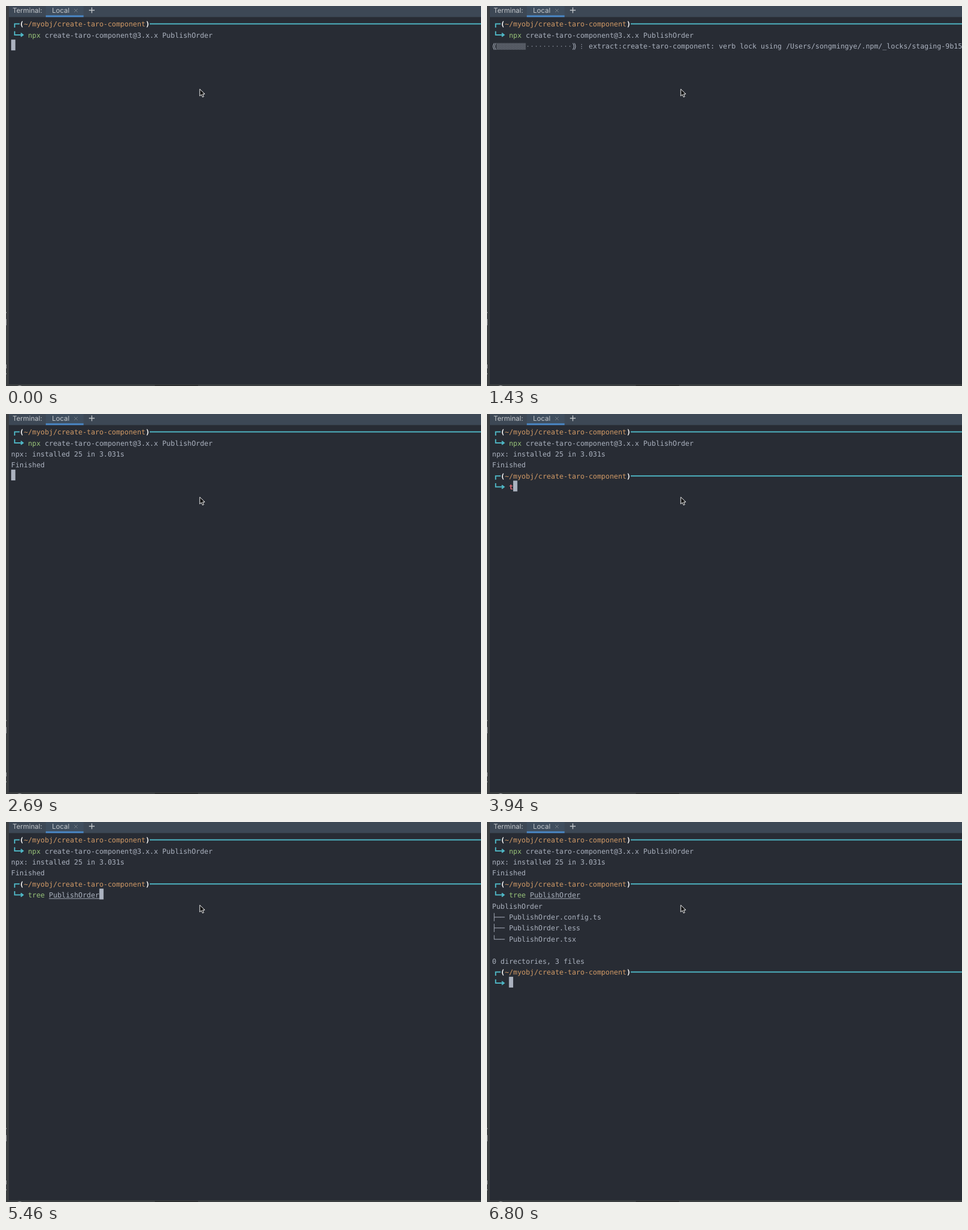
An HTML page that plays this animation: 836x670 px, repeating every 8000 ms.

```html
<!DOCTYPE html>
<html lang="en">
<head>
<meta charset="utf-8">
<title>Terminal</title>
<style>
  html, body { margin: 0; width: 100%; height: 100%; overflow: hidden; background: #282c34; }
  svg { display: block; }
  text { white-space: pre; text-rendering: geometricPrecision; }
  .mono { font: 12.275px "DejaVu Sans Mono", monospace; }
  .ui { font: 12px Inter, sans-serif; fill: #c3c7cb; }
  .bold { font-weight: bold; }
</style>
</head>
<body>
<svg id="stage" width="836" height="670" viewBox="0 0 836 670">
  <defs>
    <pattern id="shade" width="2.463" height="2.6" patternUnits="userSpaceOnUse" x="16.5" y="65.4">
      <rect x="0.1" y="0.1" width="1.05" height="1.05" fill="#abb2bf"/>
      <rect x="1.33" y="1.4" width="1.05" height="1.05" fill="#abb2bf"/>
    </pattern>
  </defs>
  <rect width="836" height="670" fill="#3c3f41"/>
  <rect x="5" y="19" width="831" height="648" fill="#282c34"/>
  <rect x="5" width="831" height="19.5" fill="#3d4855"/>
  <rect x="70" width="66.5" height="17" fill="#3f4e5e"/>
  <rect x="70" y="16.5" width="66.5" height="3" fill="#4a88c7"/>
  <text class="ui" x="11.5" y="12">Terminal:</text>
  <text class="ui" x="81" y="12">Local</text>
  <path d="M120 5l6 6M126 5l-6 6" stroke="#737c85" fill="none"/>
  <path d="M146 7.5h10M151 2.5v10" stroke="#c3c7cb" stroke-width="1.4" fill="none"/>
  <path d="M0 540.5h1M0 552v11M0 632v7M0 648.5h1" stroke="#b4b7ba" stroke-width="1.6" fill="none"/>
  <rect x="262" y="668" width="76" height="2" fill="#2b2d2f"/>
  <path d="M20 670.5q4-2.5 8 0" stroke="#a5a8ab" fill="none"/>
  <g id="screen"></g>
  <path d="M341 146.5v12.2l2.9-2.7 2 4.6 2.2-1-2-4.4h3.9z" fill="#111" stroke="#fff" stroke-width="1"/>
</svg>
<script>
const LOOP = 8000;
const X0 = 9.1, CELL = 7.39, ROW = 19.42;
const FG = "#abb2bf", CYAN = "#4fb8c6", GREEN = "#98c379", ORANGE = "#d19a66", RED = "#e06c75";
const screen = document.getElementById("screen");
const timed = [];

const colX = col => X0 + col * CELL;
const baseY = row => 36.1 + row * ROW;

function add(parent, tag, attrs, content) {
  const el = document.createElementNS("http://www.w3.org/2000/svg", tag);
  for (const key in attrs) el.setAttribute(key, attrs[key]);
  if (content) el.textContent = content;
  return parent.appendChild(el);
}

// A group that is visible from one time up to another.
function during(from, to) {
  const el = add(screen, "g", {});
  timed.push({ el, from, to });
  return el;
}

function write(g, row, col, content, fill = FG, bold = false) {
  add(g, "text", { class: bold ? "mono bold" : "mono", x: colX(col), y: baseY(row), fill }, content);
}

function cursor(g, row, col) {
  add(g, "rect", { x: colX(col), y: 20.4 + row * ROW, width: CELL, height: 19, fill: FG });
}

function line(g, d, stroke, width) {
  add(g, "path", { d, stroke, "stroke-width": width, fill: "none" });
}

function prompt(g, row) {
  const y = 31.5 + row * ROW, y2 = y + ROW;
  line(g, `M24 ${y}H15.2V${y + 6.5}M${colX(33)} ${y}H836`, CYAN, 2);
  line(g, `M15.2 ${y2 - 6.5}V${y2}H29.5M26 ${y2 - 3}L30 ${y2}L26 ${y2 + 3}`, CYAN, 2);
  write(g, row, 2, "(", "#fff", true);
  write(g, row, 3, "~/myobj/create-taro-component", ORANGE);
  write(g, row, 32, ")", "#fff", true);
}

function dot(g, col, dx, dy) {
  add(g, "circle", { cx: colX(col) + dx, cy: 71 + dy, r: 0.75, fill: FG });
}

// Braille spinner; dots are numbered 1-3 down the left, 4-6 down the right.
function spinner(g, dots) {
  for (const n of dots) dot(g, 21, n > 3 ? 5 : 2.2, ((n - 1) % 3 - 1) * 3.3 + 0.4);
}

function progress(from, to, filled, dots, message) {
  const g = during(from, to);
  for (const [x, dir] of [[15.6, -1], [151, 1]]) {
    for (const dx of [0, 2.7]) {
      const sx = x + dx * (dir < 0 ? -1 : 1);
      line(g, `M${sx} 65.5q${dir * 4.4} 5.8 0 11.6`, FG, 1.1);
    }
  }
  if (filled) add(g, "rect", { x: colX(1), y: 65.4, width: filled * CELL, height: 11.7, fill: "url(#shade)" });
  for (let i = filled; i < 18; i++) dot(g, i + 1, 3.7, 0);
  spinner(g, dots);
  write(g, 2, 23, message);
}

const first = during(0, LOOP);
prompt(first, 0);
write(first, 1, 4, "npx", GREEN);
write(first, 1, 8, "create-taro-component@3.x.x PublishOrder");

progress(780, 1170, 0, [1, 2, 4], "rollbackFailedOptional: verb npm-session 1c2c3ae0ac3c8ab2");
progress(1170, 1260, 2, [1, 4, 5], "loadIdealTree:loadAllDepsIntoIdealTree: sill install loadIdealTree");
progress(1260, 1430, 2, [4, 5, 6], "fetchMetadata: sill resolveWithNewModule create-taro-component@3.x.x checking installable status");
progress(1430, 2090, 7, [1, 2, 3], "extract:create-taro-component: verb lock using /Users/songmingye/.npm/_locks/staging-9b153f.lock");
progress(2090, 2195, 7, [1, 2, 3, 4], "extract:create-taro-component: sill extract create-taro-component@3.x.x extracted to staging");
progress(2195, 2300, 12, [3, 4, 5, 6], "finalize:create-taro-component: sill finalize create-taro-component");
progress(2300, 2480, 12, [3, 5, 6], "refresh-package-json:create-taro-component: timing action:finalize Completed in 56ms");

write(during(2585, LOOP), 2, 0, "npx: installed 25 in 3.031s");
write(during(2690, LOOP), 3, 0, "Finished");
prompt(during(3040, LOOP), 4);

const typing = [[3940, "t"], [4120, "tr"], [4300, "tre"], [4840, "tree"]];
typing.forEach(([from, word], i) => {
  const done = word === "tree";
  const to = done ? LOOP : typing[i + 1][0];
  write(during(from, to), 5, 4, word, done ? GREEN : RED, !done);
});

const folder = during(5460, LOOP);
write(folder, 5, 9, "PublishOrder");
line(folder, `M${colX(9)} 135H${colX(21)}`, FG, 1);

const tree = during(6540, LOOP);
write(tree, 6, 0, "PublishOrder");
["config.ts", "less", "tsx"].forEach((ext, i) => {
  write(tree, 7 + i, 0, i < 2 ? "├──" : "└──");
  write(tree, 7 + i, 4, "PublishOrder." + ext);
});
write(tree, 11, 0, "0 directories, 3 files");
prompt(during(6800, LOOP), 12);

// Cursor stops: from, to, row, column.
[
  [0, 780, 2, 0], [2480, 2585, 2, 0], [2585, 2690, 3, 0], [2690, 3040, 4, 0],
  [3040, 3940, 5, 4], [3940, 4120, 5, 5], [4120, 4300, 5, 6], [4300, 4840, 5, 7],
  [4840, 5200, 5, 8], [5200, 5460, 5, 9], [5460, 6540, 5, 21],
  [6540, 6800, 12, 0], [6800, LOOP, 13, 4]
].forEach(([from, to, row, col]) => cursor(during(from, to), row, col));

const start = performance.now();

function render(now) {
  const t = Math.max(0, now - start) % LOOP;
  for (const { el, from, to } of timed) el.style.display = t >= from && t < to ? "" : "none";
  requestAnimationFrame(render);
}
render(start);
</script>
</body>
</html>
```
